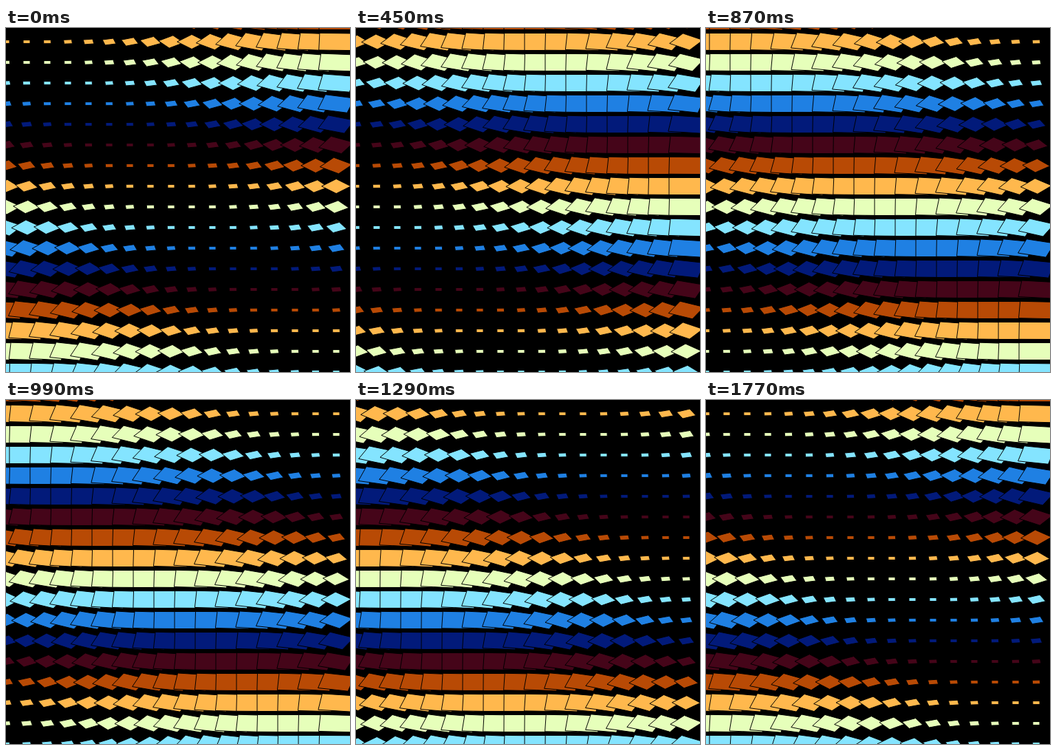
Recreate the animation shown at these times as an HTML page with a canvas. Size 500 by 500 pixels, loop 1.8 s.

```html
<!DOCTYPE html>
<html lang="en">
<head>
<meta charset="utf-8">
<title>Tilting tiles</title>
<style>
html, body { margin: 0; width: 100%; height: 100%; overflow: hidden; background: #000; }
canvas { display: block; }
</style>
</head>
<body>
<canvas id="stage" width="500" height="500"></canvas>
<script>
const ctx = document.getElementById('stage').getContext('2d');
const SIZE = 500, STEP = 30, LOOP = 1800, TICK = 30;
const colors = ['#b84a05', '#ffb84d', '#e6ffba', '#84e4ff', '#1f80e3', '#021a7a', '#450519'];

// A square that turns a quarter as it grows, flattened to half height.
function tile(x, y, grow, color) {
  const side = 10 + 40 * grow;
  ctx.save();
  ctx.translate(x, y);
  ctx.scale(1, 0.5);
  ctx.rotate(-grow * Math.PI / 2);
  ctx.beginPath();
  ctx.rect(-side / 2, -side / 2, side, side);
  ctx.restore();
  ctx.fillStyle = color;
  ctx.fill();
  ctx.stroke();
}

function draw(progress) {
  ctx.fillStyle = '#000';
  ctx.fillRect(0, 0, SIZE, SIZE);
  for (let row = 0; row < 18; row++) {
    const y = row * STEP - 10;
    for (let x = 0; x < SIZE; x += STEP) {
      const phase = 2 * Math.PI * (progress + (x - y) / (2 * SIZE));
      tile(x, y, (1 - Math.cos(phase)) / 2, colors[row % colors.length]);
    }
  }
}

function frame() {
  const time = performance.now() % LOOP;
  draw(Math.floor(time / TICK) * TICK / LOOP);
  requestAnimationFrame(frame);
}
frame();
</script>
</body>
</html>
```
